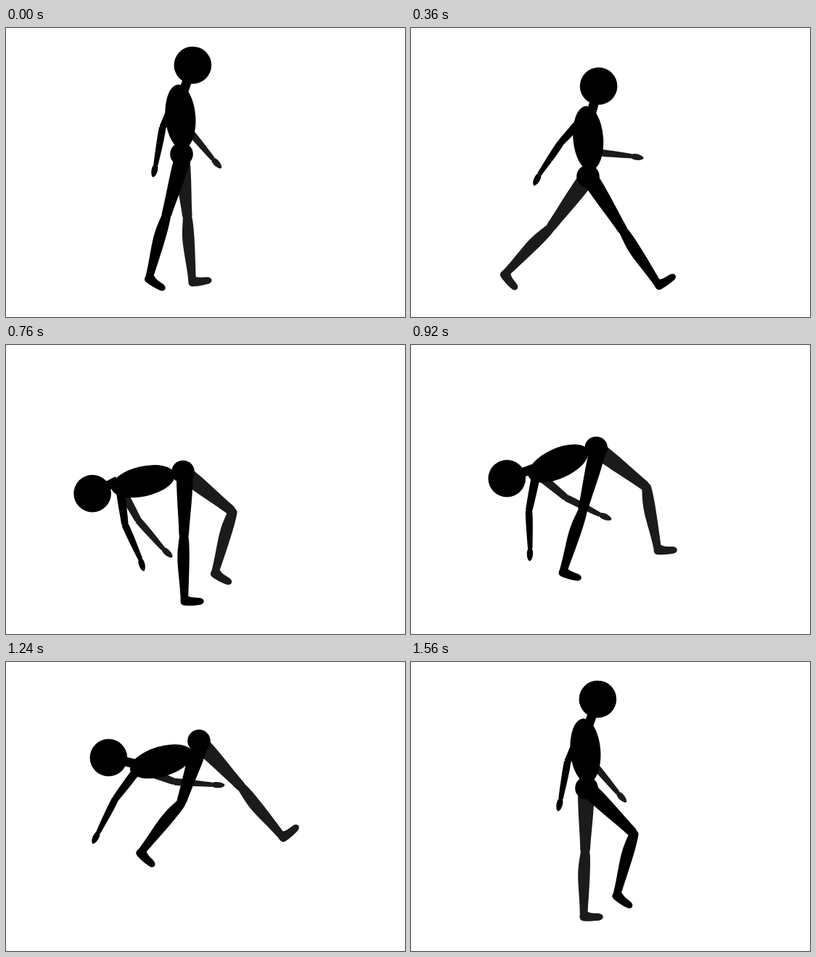
An HTML page that plays this animation: 550x400 px, repeating every 1600 ms.

```html
<!DOCTYPE html>
<html lang="en">
<head>
<meta charset="utf-8">
<title>Backbend walk</title>
<style>
  html, body { margin: 0; width: 100%; height: 100%; overflow: hidden; background: #fff; }
  svg { display: block; width: 100vw; height: 100vh; }
</style>
</head>
<body>
<svg id="stage" viewBox="0 0 550 400"></svg>
<script>
const NS = 'http://www.w3.org/2000/svg';
const stage = document.getElementById('stage');
const FRAME = 40, COUNT = 40;
const RAD = Math.PI / 180;
const NEAR = '#000', FAR = '#1c1a1a';

// Bones hang down from their joint; the foot points right with a flat sole.
const SHAPES = {
  thigh: 'M-11 0C-11 30-7.5 60-6.8 84A6.8 6.8 0 0 0 6.8 84C8 60 12 30 11.8 0Z',
  shin: 'M-6.5 1A6.5 6.5 0 0 1 6.5 1C8.5 20 6.5 55 5.2 87Q0 92-5.2 87C-6 62-10 40-9 24C-8.5 14-7 6-6.5 1Z',
  foot: 'M-5.5 0C-5.5-8 4-7.5 6-6C10-4 15-4.5 21-4C28.5-3 28.5 4 22 5.5C14 7 4 7 0 6.5C-4 6-5.5 4-5.5 0Z',
  upper: 'M-6 0C-6 20-5 40-4.7 52Q0 57 4.7 52C5.5 40 6 20 6 0Q0-6-6 0Z',
  fore: 'M-4.7 0Q0-4 4.7 0C5.5 15 4 35 3.2 52L-3.2 52C-4 35-5 15-4.7 0Z',
  hand: 'M-2.5 0Q0-2 2.5 0C5 4 4.5 11 2.5 15Q0 20-2.5 15C-4.5 11-5 4-2.5 0Z',
  torso: 'M-20.8 0A20.8 44.7 0 0 1 20.8 0A20.8 44.7 0 0 1-20.8 0Z',
  neck: 'M-6.5 3L6.5 3L6.5-20L-6.5-20Z',
  ball: 'M-1 0A1 1 0 0 1 1 0A1 1 0 0 1-1 0Z'
};
const LENGTH = { thigh: 88, shin: 88.5, upper: 53, fore: 52 };

// Joint angles in degrees at the key poses; limbs are measured from straight down.
const KEYS = [0, 9, 19, 29, 39];
const POSE = {
  hipX: [242, 244, 244, 272, 242],
  hipY: [174.5, 205.5, 175.5, 93, 174.5],
  torso: [-4.5, -4.5, -103, -132, -4.5],
  head: [19.3, 15, -117, -101, 19.3]
};
const LIMBS = {
  farLeg: {
    thigh: [6, -36, 52, 54.5, -0.6],
    shin: [4.3, -44.5, -16, 49.5, -1.3],
    foot: [97, 40, 60, 138, 90]
  },
  farArm: {
    upper: [15, 11, 28.6, 83, 15],
    fore: [40, 84, 41, 97, 40],
    hand: [42, 80, 47, 98, 42]
  },
  nearLeg: {
    thigh: [-15.5, 32.5, -0.5, -33.5, 46],
    shin: [-15.3, 33, 0.5, -45, -15.6],
    foot: [57, 123, 90, 45, 54]
  },
  nearArm: {
    upper: [-24.7, -42, 7.7, -40, -24.7],
    fore: [-10.2, -34, 24, -31, -10.2],
    hand: [-13, -26, 16, -30, -13]
  }
};
// The waist joint swings around the pelvis.
const WAIST = {
  at: [0, 9, 13, 19, 27, 31, 39],
  reach: [8.7, 9, 10.5, 2.9, 7, 10.6, 8.7],
  turn: [149, 135, 121, 149, 92, 263, 509]
};

function tween(values, f, at = KEYS) {
  let i = 0;
  while (i < at.length - 2 && f >= at[i + 1]) i++;
  const k = (f - at[i]) / (at[i + 1] - at[i]);
  return values[i] + (values[i + 1] - values[i]) * k;
}

function add(shape, color) {
  const path = document.createElementNS(NS, 'path');
  path.setAttribute('d', SHAPES[shape]);
  path.setAttribute('fill', color);
  return stage.appendChild(path);
}

function place(el, p, deg, scale = 1) {
  el.setAttribute('transform',
    `translate(${p.x.toFixed(2)} ${p.y.toFixed(2)}) rotate(${deg.toFixed(2)}) scale(${scale})`);
}

// Step from p along an upward heading, then to its right.
function offset(p, deg, along, side) {
  const s = Math.sin(deg * RAD), c = Math.cos(deg * RAD);
  return { x: p.x + along * s + side * c, y: p.y - along * c + side * s };
}

const parts = {};
function addLimb(name, color) {
  parts[name] = {};
  for (const bone of Object.keys(LIMBS[name])) parts[name][bone] = add(bone, color);
}

addLimb('farLeg', FAR);
addLimb('farArm', FAR);
addLimb('nearLeg', NEAR);
for (const name of ['torso', 'neck']) parts[name] = add(name, NEAR);
parts.hip = add('ball', NEAR);
parts.head = add('ball', NEAR);
addLimb('nearArm', NEAR);

function poseLimb(name, start, f) {
  let p = start;
  for (const [bone, values] of Object.entries(LIMBS[name])) {
    const a = tween(values, f);
    place(parts[name][bone], p, bone === 'foot' ? 90 - a : -a);
    const len = LENGTH[bone] || 0;
    p = { x: p.x + len * Math.sin(a * RAD), y: p.y + len * Math.cos(a * RAD) };
  }
}

function draw(f) {
  const hip = { x: tween(POSE.hipX, f), y: tween(POSE.hipY, f) };
  const lean = tween(POSE.torso, f);
  const nod = tween(POSE.head, f);
  const reach = tween(WAIST.reach, f, WAIST.at);
  const turn = tween(WAIST.turn, f, WAIST.at) * RAD;

  const chest = offset(hip, lean, 59 + reach * Math.cos(turn), -2 + reach * Math.sin(turn));
  const neck = offset(chest, lean, 37, 8);
  const shoulder = offset(chest, lean, 33, 0);

  place(parts.hip, hip, 0, 15.8);
  place(parts.torso, chest, lean);
  place(parts.neck, neck, nod);
  place(parts.head, offset(neck, nod, 36, 0), 0, 25.8);
  poseLimb('farLeg', { x: hip.x - 1, y: hip.y + 1 }, f);
  poseLimb('nearLeg', { x: hip.x + 2, y: hip.y + 2 }, f);
  poseLimb('farArm', shoulder, f);
  poseLimb('nearArm', shoulder, f);
}

function tick() {
  draw(Math.floor(performance.now() / FRAME) % COUNT);
  requestAnimationFrame(tick);
}
tick();
</script>
</body>
</html>
```
